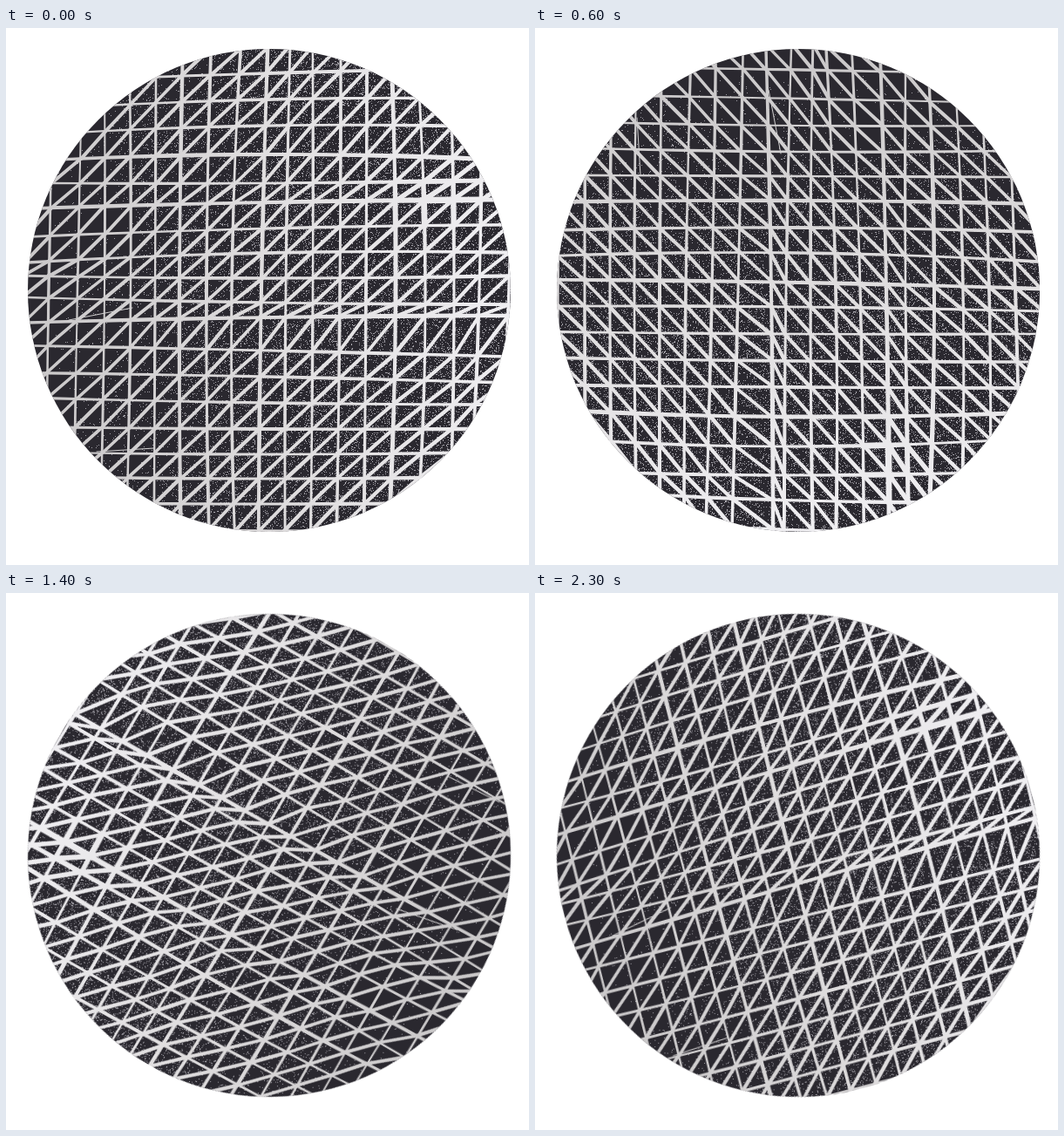
An HTML page with a canvas that plays this animation: 600 px wide and 616 px high, repeating every 2400 ms.

```html
<!DOCTYPE html>
<html lang="en">
<head>
<meta charset="utf-8">
<title>Turning printed disc</title>
<style>
html, body { margin: 0; width: 100%; height: 100%; overflow: hidden; background: #fff; }
canvas { display: block; }
</style>
</head>
<body>
<canvas id="stage" width="600" height="616"></canvas>
<script>
const CX = 302, CY = 301, R = 277;

// Each grid line is a gentle curve through three positions: at 60, 300 and 540.
const columns = [
  [24, 20, 16], [54, 49, 46], [87, 82, 78], [113, 113, 109], [142, 143, 139],
  [172, 171, 170], [202, 199, 200], [234, 230, 232], [267, 259, 261],
  [299, 293, 290], [325, 321, 320], [352, 352, 350], [384, 383, 380],
  [414, 413, 411], [443, 447, 441], [473, 481, 474], [510, 514, 510],
  [545, 543, 532], [578, 577, 563]
];
const rows = [
  [28, 22, 14], [60, 52, 46], [92, 82, 81], [121, 112, 113], [151, 145, 150],
  [178, 178, 175], [206, 200, 197], [238, 230, 226], [267, 258, 257],
  [285, 287, 285], [310, 315, 317], [337, 332, 330], [365, 370, 376],
  [396, 400, 406], [425, 430, 432], [458, 460, 460], [487, 489, 487],
  [515, 517, 515], [545, 546, 545], [574, 577, 578]
];

let seed = 17;
function random() {
  seed = (seed * 1664525 + 1013904223) % 4294967296;
  return seed / 4294967296;
}

const clamp = v => Math.max(0, Math.min(1, v));

function curve([a, b, c], at) {
  const u = (at - 300) / 240;
  return b + (c - a) / 2 * u + ((a + c) / 2 - b) * u * u;
}

function node(i, j) {
  const x = curve(columns[i], rows[j][1]);
  return [x, curve(rows[j], x)];
}

function segment(g, [x1, y1], [x2, y2], width) {
  g.lineWidth = width;
  g.beginPath();
  g.moveTo(x1, y1);
  g.lineTo(x2, y2);
  g.stroke();
}

// Lines grow towards the right and swell around one junction.
function gain([x, y]) {
  const d = Math.hypot((x - 488) / 45, (y - 192) / 24);
  return (x - 300) / 500 + 3.5 * Math.exp(-d * d);
}

function drawSpecks(g) {
  g.fillStyle = "rgba(205,203,209,.72)";
  for (let n = 0; n < 52000; n++) {
    const x = CX - R + random() * 2 * R, y = CY - R + random() * 2 * R;
    const patch = Math.sin(x / 31 + y / 57) * Math.sin(y / 37 - x / 83);
    const density = 0.12 + 0.68 * clamp((x - 90) / 260) + 0.16 * patch;
    if (random() < density * clamp((x - 45) / 90)) g.fillRect(x | 0, y | 0, 1, 1);
  }
}

function drawGrid(g) {
  const ink = g.createLinearGradient(30, 330, 570, 270);
  ink.addColorStop(0, "#cac8c9");
  ink.addColorStop(0.5, "#dfddde");
  ink.addColorStop(1, "#efeef1");
  g.strokeStyle = ink;
  g.lineCap = "round";

  columns.forEach((_, i) => {
    const base = [6, 9, 14].includes(i) ? 4.3 : 2.7 + random() * 0.9;
    for (let j = 0; j < rows.length - 1; j++) {
      const p = node(i, j);
      segment(g, p, node(i, j + 1), base + gain(p) + 0.5 * Math.sin(j * 0.8 + i));
    }
  });
  rows.forEach((_, j) => {
    const base = [4, 6, 11].includes(j) ? 4.4 : 2.9 + random() * 0.9;
    for (let i = 0; i < columns.length - 1; i++) {
      const p = node(i, j);
      segment(g, p, node(i + 1, j), base + gain(p) + 0.5 * Math.sin(i * 0.7 + j));
    }
  });
  for (let i = 0; i < columns.length - 1; i++) {
    for (let j = 0; j < rows.length - 1; j++) {
      const p = node(i, j + 1), q = node(i + 1, j);
      const shift = 1.2 * Math.sin(i * 1.9 + j * 1.3);
      segment(g, [p[0] + shift, p[1]], [q[0] + shift, q[1]],
        3.6 + gain(p) * 0.6 + random() * 0.9);
    }
  }
  // fine scratches
  segment(g, [72, 335], [145, 321], 1);
  segment(g, [104, 486], [170, 482], 1);
}

function makeDisc() {
  const disc = document.createElement("canvas");
  disc.width = 600;
  disc.height = 616;
  const g = disc.getContext("2d");
  g.beginPath();
  g.arc(CX, CY, R, 0, 2 * Math.PI);
  g.clip();
  g.fillStyle = "#2a282f";
  g.fillRect(0, 0, 600, 616);
  drawSpecks(g);
  drawGrid(g);
  return disc;
}

const disc = makeDisc();
const ctx = document.getElementById("stage").getContext("2d");

function draw(time) {
  const step = Math.floor(time / 100) % 24;
  ctx.setTransform(1, 0, 0, 1, 0, 0);
  ctx.fillStyle = "#fff";
  ctx.fillRect(0, 0, 600, 616);
  ctx.translate(CX, CY);
  ctx.rotate(step * Math.PI / 12);
  ctx.drawImage(disc, -CX, -CY);
  requestAnimationFrame(draw);
}
draw(0);
</script>
</body>
</html>
```
